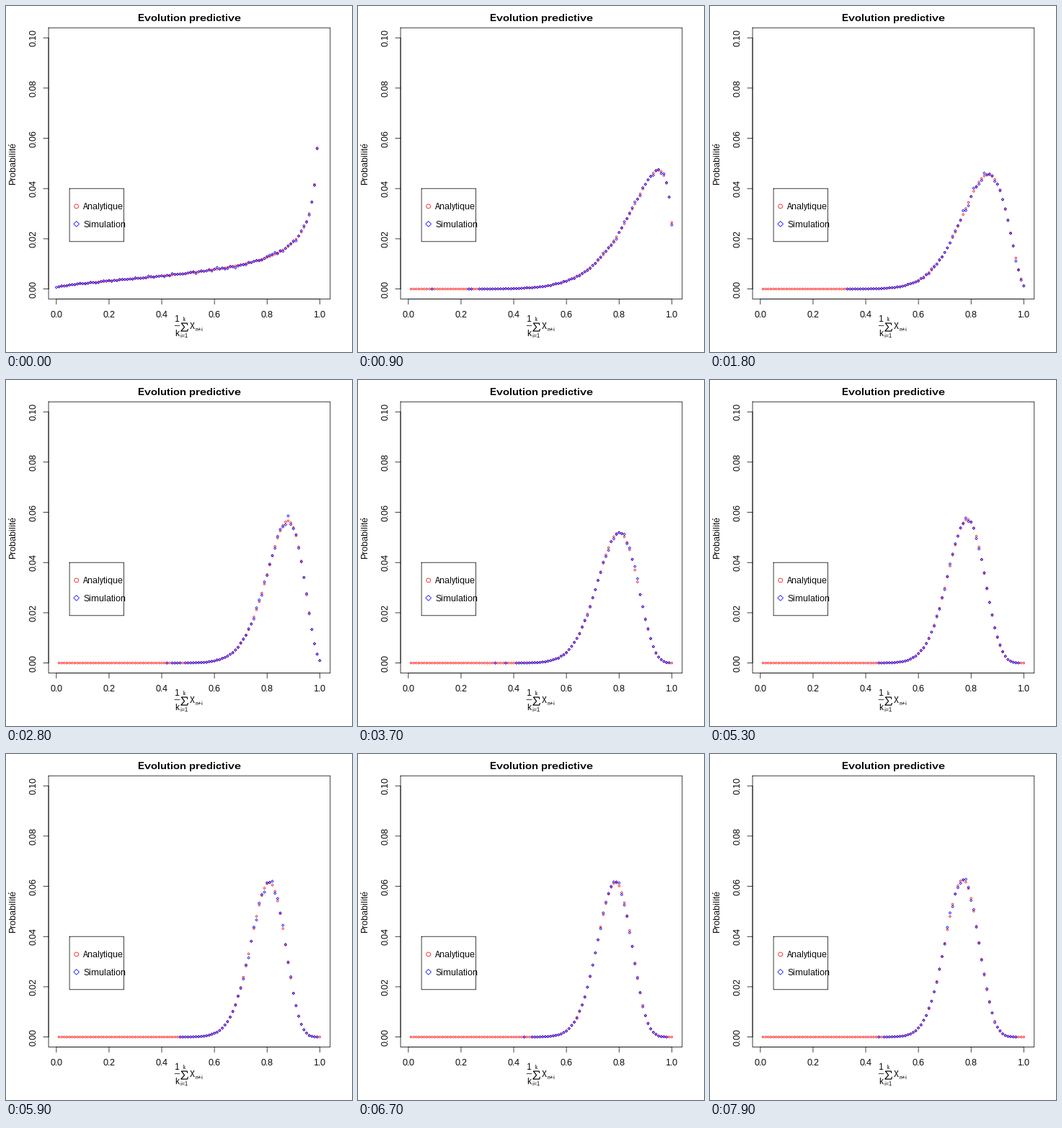
Recreate the animation shown at these times as a matplotlib script. Size 480 by 480 pixels, loop 8 s.

```python
from math import exp, lgamma

import matplotlib.pyplot as plt
import numpy as np
from matplotlib.animation import FuncAnimation
from matplotlib.collections import PolyCollection

SIZE, DPI = 480, 100
PT = 72 / DPI  # points per pixel
STROKE = 0.75  # line width in pixels
FRAMES, INTERVAL = 80, 100
K, DRAWS = 100, 100_000
LEFT, RIGHT, TOP, BOTTOM = 59.04, 449.76, 30.24, 406.56
X_MIN, X_MAX, Y_MIN, Y_MAX = -0.0296, 1.0396, -0.004, 0.104

# Trials that fail; every other observed trial is a success.
FAILURES = (7, 15, 17, 28, 30, 32, 35, 37, 41, 44,
            50, 53, 64, 66, 68, 72, 74, 76, 78)

# Whole-pixel glyph advances, as in hinted screen text
plt.rcParams.update({"font.family": "Liberation Sans",
                     "text.hinting": "native",
                     "text.hinting_factor": 1,
                     "text.kerning_factor": 6})


def to_x(v):
    return LEFT + (v - X_MIN) / (X_MAX - X_MIN) * (RIGHT - LEFT)


def to_y(v):
    return BOTTOM - (v - Y_MIN) / (Y_MAX - Y_MIN) * (BOTTOM - TOP)


def log_beta(a, b):
    return lgamma(a) + lgamma(b) - lgamma(a + b)


def predictive(n):
    """Beta-binomial law of K future trials after n, with a Jeffreys prior."""
    bad = sum(t <= n for t in FAILURES)
    a, b = n - bad + 0.5, bad + 0.5
    p = [exp(lgamma(K + 1) - lgamma(j + 1) - lgamma(K - j + 1)
             + log_beta(j + a, K - j + b) - log_beta(a, b))
         for j in range(K + 1)]
    return np.array(p) / sum(p)


def ring(radius, sides):
    t = np.arange(sides) * 2 * np.pi / sides
    return radius * np.column_stack([np.cos(t), np.sin(t)])


def outlines(shape, xs, ps):
    centers = np.column_stack([to_x(xs), to_y(ps)])
    return centers[:, None, :] + shape


fig = plt.figure(figsize=(SIZE / DPI, SIZE / DPI), dpi=DPI, facecolor="white")
ax = fig.add_axes([0, 0, 1, 1])
ax.set_xlim(0, SIZE)
ax.set_ylim(SIZE, 0)
ax.axis("off")


def line(xs, ys, width=STROKE):
    ax.plot(xs, ys, color="black", lw=width * PT, snap=False,
            solid_capstyle="round", solid_joinstyle="round")


def box(x0, y0, x1, y1):
    line([x0, x1, x1, x0, x0], [y0, y0, y1, y1, y0])


def label(x, y, s, size=12, ha="left", **kw):
    ax.text(x, y, s, fontsize=size * PT, ha=ha, va="baseline",
            rotation_mode="anchor", color="black", **kw)


def markers(verts, color):
    art = PolyCollection(verts, facecolors="none", edgecolors=color,
                         linewidths=STROKE * PT, joinstyle="round", snap=False)
    ax.add_collection(art, autolim=False)
    return art


# Frame, axes and titles
box(LEFT, TOP, RIGHT, BOTTOM)
line([to_x(0), to_x(1)], [BOTTOM, BOTTOM])
line([LEFT, LEFT], [to_y(0), to_y(0.1)])
for i in range(6):
    x, y = to_x(i / 5), to_y(i / 50)
    line([x, x], [BOTTOM, BOTTOM + 7.2])
    line([LEFT - 7.2, LEFT], [y, y])
    label(x, 432.3, f"{i / 5:.1f}", ha="center")
    label(42, y, f"{i / 50:.2f}", ha="center", rotation=90)
mid_x, mid_y = (LEFT + RIGHT) / 2, (TOP + BOTTOM) / 2
label(mid_x, 21, "Evolution predictive", 14.4, "center", weight="bold")
label(13, mid_y, "Probabilité", ha="center", rotation=90)

# Axis formula: mean of the next k trials
label(237.6, 438.3, "1", ha="center")
line([234, 241], [443.5, 443.5])
label(237.6, 458.2, "k", ha="center")
line([251.7, 251.2, 243.4, 247.6, 242.8, 251.6, 252.4],
     [442.3, 440, 440, 445.5, 451, 451, 448.4], 1.2)
label(247.2, 437, "k", 8.4, "center")
label(246.6, 460, "i=1", 8.4, "center")
label(254.9, 448.3, "X")
label(262.8, 451, "n+i", 8.4)

# Legend
box(88.1, 253.2, 163.5, 326.8)
markers([ring(2.9, 24) + (97.7, 277.9)], "red")
markers([ring(3.8, 4) + (97.7, 302.4)], "blue")
label(107, 282.2, "Analytique")
label(107, 306.8, "Simulation")

DOT, DIAMOND = ring(1.3, 12), ring(1.69, 4)
exact = markers([], "red")
simulated = markers([], "blue")
grid = np.arange(K + 1) / K


def update(i):
    p = predictive(i + 1)
    freq = np.random.default_rng(100 + i).multinomial(DRAWS, p) / DRAWS
    shown = (p < Y_MAX) & (grid > 0)
    exact.set_verts(outlines(DOT, grid[shown], p[shown]))
    shown = (freq > 0) & (freq < Y_MAX)
    simulated.set_verts(outlines(DIAMOND, grid[shown], freq[shown]))
    return exact, simulated


anim = FuncAnimation(fig, update, frames=FRAMES, interval=INTERVAL,
                     repeat=True, repeat_delay=0)
plt.show()
```
